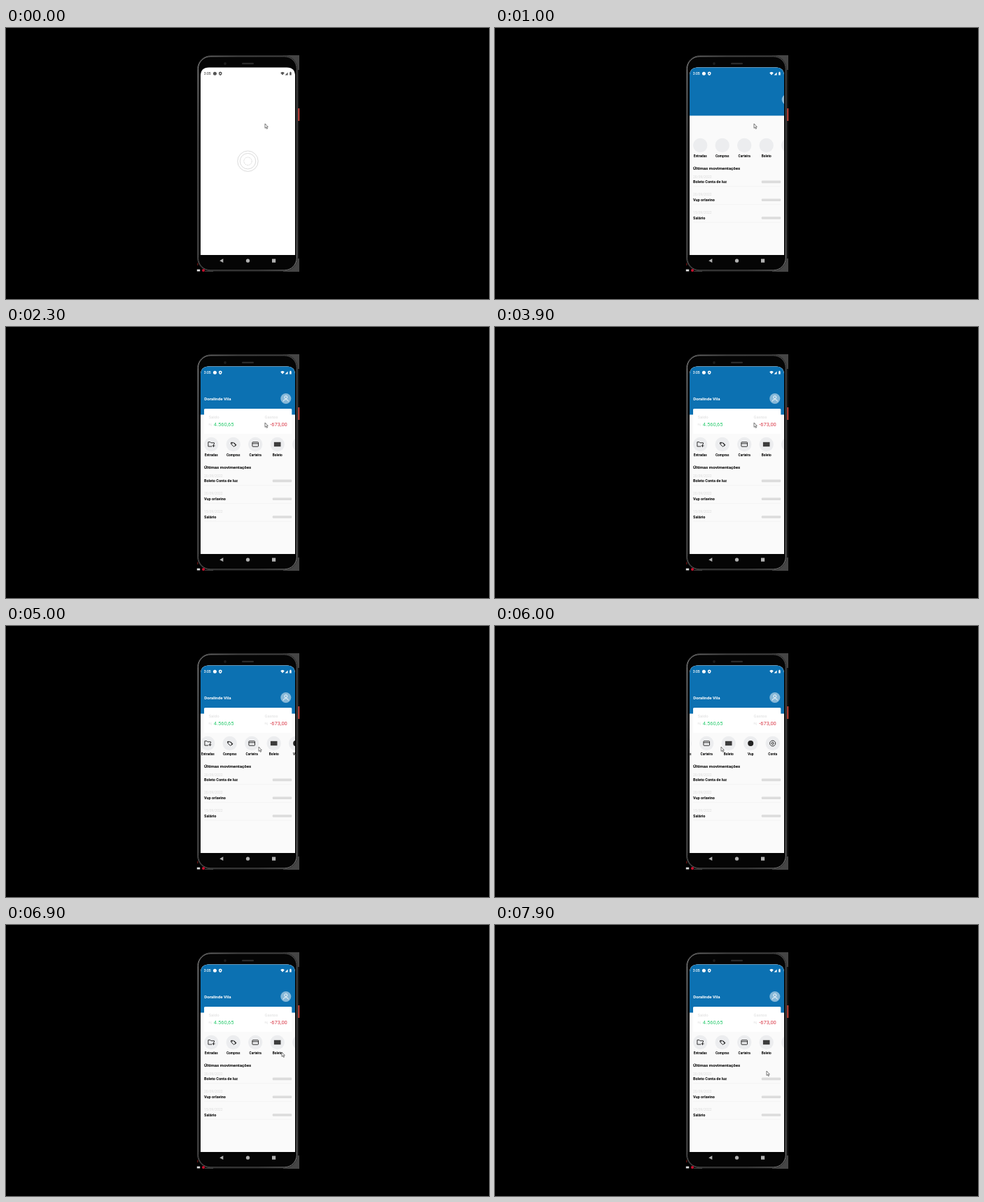
Recreate the animation shown at these times as an HTML page. Size 690 by 388 pixels, loop 8000 ms.

```html
<!DOCTYPE html>
<html lang="pt">
<head>
<meta charset="utf-8">
<style>
html, body { margin: 0; width: 100%; height: 100%; overflow: hidden; background: #000; }
svg { display: block; width: 690px; height: 388px; font-family: Roboto, sans-serif; }
.b { font-weight: 700; }
.pale { fill: #dcdcdc; }
.line { fill: none; stroke: #1c1c1c; stroke-width: .9; }
</style>
</head>
<body>
<svg viewBox="0 0 690 388">
  <defs>
    <clipPath id="screen"><path d="M278 325V68.500q0-12 12-12H401q12 0 12 12V325z"/></clipPath>
    <linearGradient id="rim" x2="1" y2="1">
      <stop offset="0" stop-color="#a8a8a8"/>
      <stop offset=".2" stop-color="#666"/>
      <stop offset=".8" stop-color="#5c5c5c"/>
      <stop offset="1" stop-color="#999"/>
    </linearGradient>
  </defs>

  <!-- phone body -->
  <path d="M396 39h23v24h-23zM396 326h23v23h-23z" fill="#454545"/>
  <rect x="415" y="60" width="4" height="270" fill="#121212"/>
  <rect x="417.4" y="115" width="1.8" height="18" fill="#d8483f"/>
  <rect x="273.4" y="39.600" width="143" height="308.400" rx="19" fill="#050505" stroke="#3c3c3c" stroke-width=".8"/>
  <rect x="274.500" y="40.800" width="140.800" height="306" rx="17.500" fill="none" stroke="url(#rim)" stroke-width=".9"/>
  <rect x="337" y="49.8" width="17" height="2.2" rx="1.1" fill="#2b2b2b"/>
  <circle cx="313" cy="51" r="1.9" fill="#1d1d1d"/>
  <path d="M284 348.4h12" stroke="#555" stroke-width=".8"/>
  <rect x="272.8" y="345.6" width="4.4" height="2.8" fill="#ddd"/>
  <circle cx="282" cy="347" r="2" fill="#c8102e"/>
  <rect x="273" y="336.500" width="1.4" height="3.500" fill="#5a1010"/>
  <g fill="#b0b0b0">
    <path d="M305.200 333.200L310.300 330.300V336.100z"/>
    <circle cx="345.500" cy="333.200" r="2.600"/>
    <rect x="380" y="330.600" width="5.200" height="5.200"/>
  </g>

  <g clip-path="url(#screen)">
    <rect x="278" y="56" width="135" height="269" fill="#fff"/>
    <g id="splash" fill="none" stroke="#d2d2d2" stroke-width=".8">
      <circle cx="345.500" cy="190.700" r="14.700"/>
      <circle cx="345.500" cy="190.700" r="11.200"/>
      <circle cx="345.500" cy="190.700" r="5.700" stroke-dasharray="2 .8"/>
    </g>

    <g id="home">
      <rect x="278" y="56" width="135" height="269" fill="#fafafa"/>
      <rect x="278" y="56" width="135" height="69.500" fill="#0c71b2"/>
      <text id="owner" class="b" x="283.300" y="105" font-size="6.100" fill="#fff">Doralinde Vila</text>
      <g id="user">
        <circle cx="399.800" cy="102.500" r="7.500" fill="#fff" fill-opacity=".5"/>
        <g fill="none" stroke="#fff" stroke-width=".9">
          <circle cx="399.800" cy="100.600" r="2"/>
          <path d="M396.200 106.600q0-2.900 3.600-2.900t3.600 2.900"/>
        </g>
      </g>

      <g id="card">
        <path id="plate" fill="#fff"/>
        <g id="sums">
          <g class="pale" font-size="6">
            <text x="289.500" y="131.200">Saldo</text>
            <text x="369.500" y="131.200">Gastos</text>
            <text x="289.500" y="141" font-size="4">R$</text>
            <text x="369.500" y="141" font-size="4">R$</text>
          </g>
          <text x="296.800" y="141.800" font-size="7.500" fill="#2ecc71">4.560,65</text>
          <text x="377.200" y="141.800" font-size="7.500" fill="#d93a48">-673,00</text>
        </g>
      </g>

      <g id="actions"></g>
      <text class="b" x="283" y="202.800" font-size="6.200">Últimas movimentações</text>
      <g id="moves"></g>
    </g>

    <g id="status">
      <text x="282.800" y="67" font-size="5" font-weight="500">3:05</text>
      <circle cx="298.400" cy="65.200" r="2.500"/>
      <path d="M306.200 62.600l2.200.8v2q0 1.800-2.200 2.600-2.200-.8-2.200-2.600v-2z"/>
      <circle id="hole" cx="306.200" cy="65.200" r=".9"/>
      <path d="M392.200 64.200q2.800-2.200 5.600 0L395 67.400zM398.600 67.400h4v-4zM405.200 63.400h.6v-.6h1.300v.6h.6v4.200h-2.500z"/>
    </g>
  </g>

  <path id="cursor" d="M0 0V6.400L1.500 5.100 2.500 7.400 3.500 7 2.500 4.700H4.300z" fill="#fff" stroke="#444" stroke-width=".7"/>
</svg>

<script>
const $ = id => document.getElementById(id);

// Icons are drawn around their own centre.
const actions = [
  ['Entradas', '<path class="line" d="M1 3H-4.300V-3.300H-1.300L-.3-2.200H4.200V0M1.300 2H5.300M3.300 0V4"/>'],
  ['Compras', '<path class="line" d="M-3.200-2.600H-.2L3.400 1 .8 3.400-3.200-.4zM.9-2.500L4.300.8 2.600 2.600"/><circle cx="-1.700" cy="-1.200" r=".7"/>'],
  ['Carteira', '<rect class="line" x="-4.300" y="-3.200" width="8.600" height="6.400" rx=".7"/><path class="line" d="M-4.300-1.100H4.300" stroke-width="1.500"/>'],
  ['Boleto', '<rect x="-4.800" y="-3.200" width="9.600" height="6.400" fill="#3c3c3c"/>'],
  ['Vup', '<circle r="4" fill="#222"/>'],
  ['Conta', '<path class="line" d="M-1.600-3.800H1.600L3.900-1.500V1.500L1.600 3.800H-1.600L-3.900 1.500V-1.500z"/><circle class="line" r="1.500"/>']
];
$('actions').innerHTML = actions.map(([name, icon], i) => `
  <g transform="translate(${293.2 + 31.5 * i} 168)">
    <circle r="10.200" fill="#ecedef"/><g class="icon">${icon}</g>
    <text class="b" y="17" font-size="4.800" text-anchor="middle">${name}</text>
  </g>`).join('');

const moves = [['20/09/2022', 'Boleto Conta de luz'], ['20/09/2022', 'Vup orlavino'], ['15/09/2022', 'Salário']];
$('moves').innerHTML = moves.map(([date, label], i) => `
  <g transform="translate(0 ${25.8 * i})">
    <text class="pale" x="283" y="214.600" font-size="5">${date}</text>
    <text class="b" x="283" y="222.400" font-size="5.500">${label}</text>
    <rect class="pale" x="380.800" y="218.600" width="27.400" height="3.600" rx="1"/>
    <path d="M283 226.800H408" stroke="#ededed" stroke-width=".5"/>
  </g>`).join('');

const icons = document.querySelectorAll('.icon');
const pointer = [
  [0, 370, 137], [4000, 370, 137], [4900, 368, 173], [5000, 361, 173], [5300, 325, 173],
  [5600, 309, 173], [5800, 309, 173], [6000, 323, 173], [6300, 375, 178], [6600, 394, 182],
  [6900, 394, 182], [7600, 386, 205], [7900, 388, 209]
];
const scroll = [[0, 0], [4900, 0], [5000, 5], [5300, 42], [5700, 64], [5800, 64], [6000, 54], [6300, 8], [6500, 0]];

const clamp = v => Math.min(1, Math.max(0, v));
const inOut = p => p < .5 ? 2 * p * p : 1 - 2 * (1 - p) ** 2;
const tween = (t, start, length) => inOut(clamp((t - start) / length));

function at(keys, t, col) {
  const i = keys.findIndex(k => k[0] > t);
  if (i < 0) return keys[keys.length - 1][col];
  const a = keys[i - 1], b = keys[i];
  return a[col] + (b[col] - a[col]) * (t - a[0]) / (b[0] - a[0]);
}
const move = (id, x, y = 0) => $(id).setAttribute('transform', `translate(${x} ${y})`);
const show = (el, on) => el.style.display = on ? '' : 'none';

function draw(t) {
  const open = t >= 900;
  show($('home'), open);
  show($('splash'), !open);
  $('status').setAttribute('fill', open ? '#fff' : '#555');
  $('hole').setAttribute('fill', open ? '#0c71b2' : '#fff');
  icons.forEach(el => show(el, t >= 1600));

  move('owner', -103 * (1 - tween(t, 1100, 800)));
  move('user', 34 * (1 - clamp((t - 900) / 500)) ** 3);

  // The card tips upright about its horizontal middle.
  const p = tween(t, 1010, 900), angle = (1 - p) * 100 * Math.PI / 180;
  const c = Math.cos(angle), lean = 2 * Math.sin(angle);
  const top = 135 - 18 * c, bottom = 135 + 18 * c;
  $('card').setAttribute('opacity', p);
  $('plate').setAttribute('d',
    `M${283 - lean} ${top + 1}l1-1H${407.3 + lean}l1 1L${408.3 - lean} ${bottom}H${283 + lean}z`);
  $('sums').setAttribute('transform', `translate(0 ${135 * (1 - c)}) scale(1 ${c})`);

  move('actions', -at(scroll, t, 1));
  move('cursor', at(pointer, t, 1), at(pointer, t, 2));
}

function tick() {
  draw(Math.floor(performance.now() % 8000 / 100) * 100);
  requestAnimationFrame(tick);
}
tick();
</script>
</body>
</html>
```
